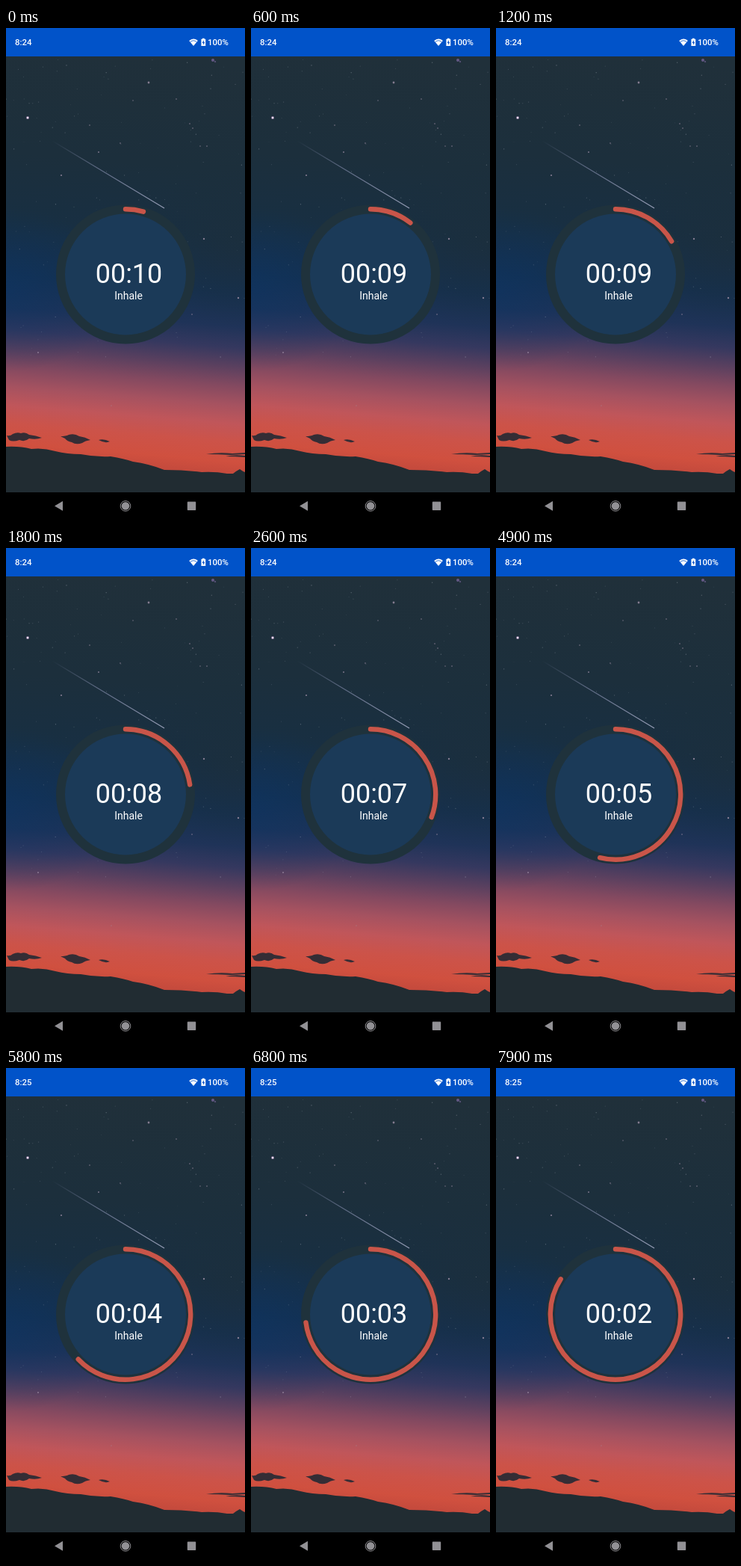
An HTML page that plays this animation: 320 px wide and 658 px high, repeating every 8 s.

```html
<!DOCTYPE html>
<html lang="en">
<head>
<meta charset="utf-8">
<title>Breathing timer</title>
<style>
  html, body { margin: 0; width: 100%; height: 100%; overflow: hidden; background: #000; }
  svg { display: block; width: 100%; height: 100%; }
  text { font-family: Roboto, "Open Sans", sans-serif; fill: #fff; }
  .status { font-size: 11.4px; font-weight: 500; }
  .label { font-size: 14px; text-anchor: middle; }
  .time { font-size: 36px; text-anchor: middle; }
</style>
</head>
<body>
<svg viewBox="0 0 320 658">
  <defs>
    <linearGradient id="sky" gradientUnits="userSpaceOnUse" x1="180" y1="38" x2="134" y2="600">
      <stop offset="0" stop-color="#20303a"/>
      <stop offset=".25" stop-color="#1c2f3c"/>
      <stop offset=".41" stop-color="#182f42"/>
      <stop offset=".54" stop-color="#15304f"/>
      <stop offset=".62" stop-color="#1f3358"/>
      <stop offset=".67" stop-color="#35385f"/>
      <stop offset=".715" stop-color="#5a405f"/>
      <stop offset=".76" stop-color="#834960"/>
      <stop offset=".805" stop-color="#a55260"/>
      <stop offset=".85" stop-color="#c0565a"/>
      <stop offset=".893" stop-color="#cc5349"/>
      <stop offset=".94" stop-color="#d0503f"/>
      <stop offset="1" stop-color="#b8443a"/>
    </linearGradient>
    <radialGradient id="blue">
      <stop offset="0" stop-color="#0b3463" stop-opacity=".6"/>
      <stop offset="1" stop-color="#0b3463" stop-opacity="0"/>
    </radialGradient>
    <radialGradient id="dusk">
      <stop offset="0" stop-color="#1d2e3a" stop-opacity=".6"/>
      <stop offset="1" stop-color="#1d2e3a" stop-opacity="0"/>
    </radialGradient>
    <linearGradient id="trail" gradientUnits="userSpaceOnUse" x1="62" y1="151" x2="212" y2="241">
      <stop offset="0" stop-color="#8089a8" stop-opacity="0"/>
      <stop offset=".4" stop-color="#8089a8" stop-opacity=".65"/>
      <stop offset="1" stop-color="#a3a9c2" stop-opacity=".9"/>
    </linearGradient>
    <filter id="soft" x="-20%" y="-50%" width="140%" height="200%"><feGaussianBlur stdDeviation=".6"/></filter>
  </defs>

  <rect y="38" width="320" height="583" fill="url(#sky)"/>
  <ellipse cx="0" cy="350" rx="150" ry="110" fill="url(#blue)"/>
  <ellipse cx="320" cy="290" rx="160" ry="110" fill="url(#dusk)"/>
  <g id="stars"></g>
  <path d="M62 151 L212 241" stroke="url(#trail)" stroke-width="1.2"/>

  <g fill="#352d35" filter="url(#soft)">
    <path d="M1 545 Q6 546 9 543 Q15 540 20 542 Q26 540 31 544 Q40 545 48 548 Q40 551 31 549 Q25 554 18 551 Q9 554 4 551 Z"/>
    <path d="M73 546 Q80 546 84 544 Q92 542 98 546 Q106 547 113 551 Q106 552 102 555 Q94 558 88 554 Q82 553 79 549 Z"/>
    <path d="M124 551 Q131 549 139 553 Q133 556 124 551 Z"/>
    <path d="M268 570 Q285 567 303 569 L320 568 V570 L300 571 Q284 570 268 570 Z"/>
    <path d="M294 573 Q306 570 320 572 V574 Q307 573 294 573 Z"/>
  </g>
  <path fill="#212c32" d="M0 560 Q18 559 34 563 Q50 561 66 566 Q82 570 100 570 Q120 574 140 573
    Q158 576 170 580 Q192 583 212 591 Q238 591 262 594 Q280 593 296 596 L304 596 Q309 592 313 590 Q317 593 320 594 V621 H0 Z"/>

  <circle cx="160" cy="329.5" r="87" fill="#1b3a58" stroke="#1f323c" stroke-width="12"/>
  <path id="arc" d="M160 242.3 a87.2 87.2 0 1 1 -.01 0" pathLength="360" fill="none"
    stroke="#c95549" stroke-width="6.4" stroke-linecap="round"/>
  <text id="time" class="time" x="164.5" y="340.5">00:10</text>
  <text class="label" x="164" y="363">Inhale</text>

  <rect width="320" height="38" fill="#0153c9"/>
  <text id="clock" class="status" x="12" y="23">8:24</text>
  <path fill="#fff" d="M245.2 17 Q251 11.8 256.8 17 L251 24 Z"/>
  <path fill="none" stroke="#0153c9" stroke-width=".8" d="M246.8 18.6 Q251 15 255.2 18.6"/>
  <path fill="#fff" d="M263 14.8 V13.8 H265.6 V14.8 H267.2 V24 H261.4 V14.8 Z"/>
  <path fill="#0153c9" d="M264.9 16.3 L262.6 20 H264 V22.8 L266.2 18.9 H264.9 Z"/>
  <text class="status" x="270" y="23">100%</text>

  <rect y="621" width="320" height="37" fill="#000"/>
  <g fill="#929195">
    <path d="M65 639.3 L76 632.8 V645.8 Z"/>
    <circle cx="160" cy="639.3" r="5.3"/>
    <circle cx="160" cy="639.3" r="6.8" fill="none" stroke="#929195" stroke-width="1"/>
    <rect x="242.8" y="633.6" width="11.4" height="11.4" rx=".8"/>
  </g>
</svg>
<script>
  const $ = id => document.getElementById(id);
  const LOOP = 8000, STEP = 100;

  function star(x, y, r, color, alpha) {
    const c = document.createElementNS('http://www.w3.org/2000/svg', 'circle');
    const attrs = { cx: x, cy: y, r, fill: color, opacity: alpha };
    for (const k in attrs) c.setAttribute(k, attrs[k]);
    $('stars').append(c);
  }

  let seed = 17;
  const rand = () => (seed = seed * 16807 % 2147483647) / 2147483647;
  for (let i = 0; i < 120; i++) {
    star(rand() * 320, 42 + Math.pow(rand(), 1.4) * 400, .35 + rand() * .3, '#a3a9b5', .2 + rand() * .35);
  }

  // Brighter stars: x, y, radius
  const bright = [
    [191, 73, 1.4], [74, 197, 1.1], [265, 282, 1.2], [124, 166, .9], [311, 361, 1.2], [249, 383, .8],
    [43, 434, .9], [246, 128, .8], [250, 134, .8], [153, 154, .8], [269, 158, .8], [112, 130, .8],
    [228, 95, .8], [170, 97, .7], [141, 505, .6], [260, 158, .7]
  ];
  bright.forEach(([x, y, r]) => star(x, y, r, '#a796ac', .75));
  star(277, 43, 2, '#77649a', .8);
  star(280, 45, 1.2, '#77649a', .6);
  star(29, 120, 2.1, '#a784b5', .75);
  star(29, 120, 1.2, '#f3e6f2', 1);

  function draw(now) {
    const t = Math.floor(now % LOOP / STEP) * STEP;
    const angle = 16 + t * .0363;
    $('arc').setAttribute('stroke-dasharray', angle + ' 400');
    $('time').textContent = '00:' + String(10 - Math.floor(angle / 36)).padStart(2, '0');
    $('clock').textContent = t < 5600 ? '8:24' : '8:25';
  }

  const start = performance.now();
  function tick() {
    draw(performance.now() - start);
    requestAnimationFrame(tick);
  }
  tick();
</script>
</body>
</html>
```
